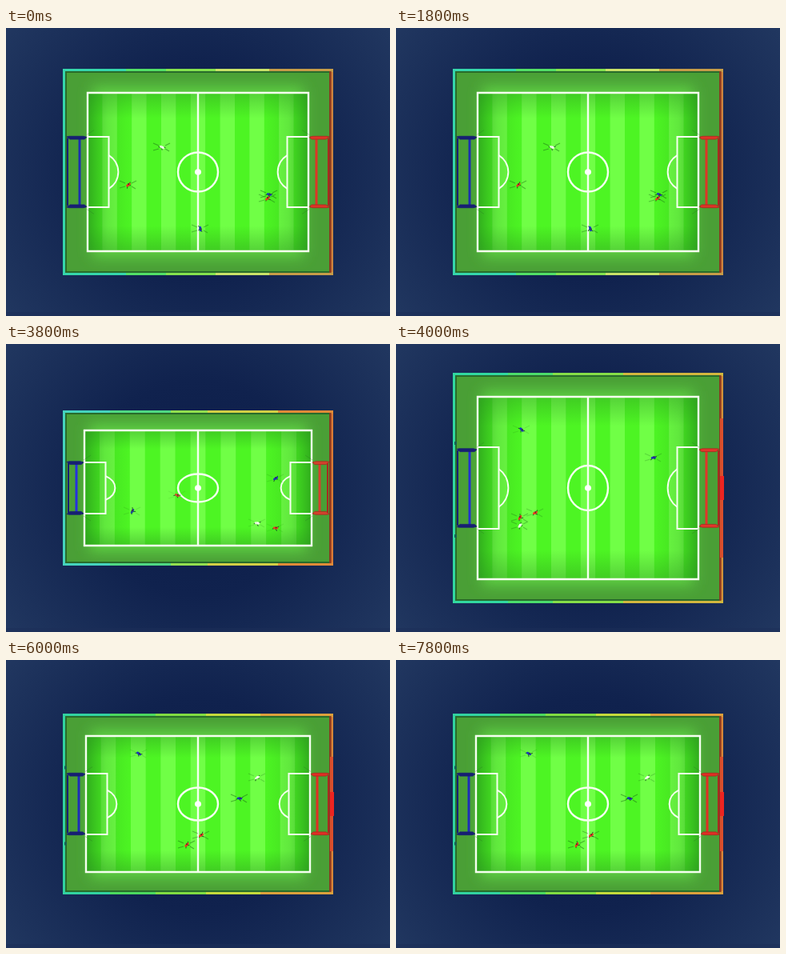
These frames come from a looping animation (480 px wide and 360 px high, 8000 ms). An HTML page:

```html
<!DOCTYPE html>
<html lang="en">
<head>
<meta charset="utf-8">
<title>Pitches</title>
<style>
html, body { margin: 0; width: 100%; height: 100%; overflow: hidden; background: #142651; }
svg { display: block; width: 100vw; height: 100vh; }
</style>
</head>
<body>
<svg id="stage" viewBox="0 0 480 360">
  <defs>
    <radialGradient id="sky" gradientUnits="userSpaceOnUse" cx="240" cy="180" r="300">
      <stop offset="0" stop-color="#0c1d49"/>
      <stop offset=".45" stop-color="#10224e"/>
      <stop offset="1" stop-color="#213760"/>
    </radialGradient>
    <linearGradient id="sides">
      <stop offset="0" stop-color="#1c7a18" stop-opacity=".6"/>
      <stop offset=".09" stop-color="#28981c" stop-opacity=".22"/>
      <stop offset=".2" stop-color="#28981c" stop-opacity="0"/>
      <stop offset=".8" stop-color="#28981c" stop-opacity="0"/>
      <stop offset=".91" stop-color="#28981c" stop-opacity=".22"/>
      <stop offset="1" stop-color="#1c7a18" stop-opacity=".6"/>
    </linearGradient>
    <linearGradient id="ends" x2="0" y2="1">
      <stop offset="0" stop-color="#2a8f20" stop-opacity=".4"/>
      <stop offset=".16" stop-color="#2a8f20" stop-opacity="0"/>
      <stop offset=".84" stop-color="#2a8f20" stop-opacity="0"/>
      <stop offset="1" stop-color="#2a8f20" stop-opacity=".4"/>
    </linearGradient>
    <filter id="soft" x="-20%" y="-20%" width="140%" height="140%"><feGaussianBlur stdDeviation="9"/></filter>
  </defs>
  <rect width="480" height="360" fill="url(#sky)"/>
  <rect y="355" width="480" height="5" fill="#1c2e58" opacity=".5"/>
</svg>
<script>
const NS = 'http://www.w3.org/2000/svg';
const stage = document.getElementById('stage');
const STEP = 200, HOLD = 2000;
const RED = '#f0391f', BLUE = '#1735c4', WHITE = '#e6f7d8';

// h: half height of arena, left/top: pitch corner, box: half height of goal area,
// ry: circle height, goal: half height of goal, bars: post x, rim: [x, colour] bands,
// team: [x, y, colour, turn, shadow strength]
const scenes = [
  { h: 129, left: 102, top: 81, box: 44, ry: 24.5, goal: 42.5, bars: [77, 92], blue: '#1c2fae', red: '#dd3526',
    rim: [[71, '#35d6ab'], [150, '#52df66'], [200, '#84e24e'], [262, '#c9e268'], [329, '#c69c48']], hot: 0,
    team: [[195, 149, WHITE, 30, 1], [153, 196, RED, -45, .9], [329, 208, BLUE, 20, 1],
           [327, 213, RED, -30, .8], [243, 251, BLUE, 80, .8]] },
  { h: 97, left: 98, top: 108, box: 32, ry: 17.5, goal: 31, bars: [78, 88], blue: '#2630e0', red: '#d3432d',
    rim: [[71, '#45d3bd'], [130, '#4fd883'], [206, '#92df4f'], [252, '#d2cf45'], [340, '#e08a38']], hot: 0,
    team: [[158, 209, '#1c4a9c', -50, .3], [214, 189, '#d0532b', 20, .2], [337, 168, BLUE, -35, .3],
           [314, 224, WHITE, 15, .3], [337, 230, RED, 10, .2]] },
  { h: 144, left: 102, top: 66, box: 51, ry: 28, goal: 47, bars: [77, 92], blue: '#2230cf', red: '#e3352a',
    rim: [[71, '#31d8a0'], [140, '#4bdc6c'], [196, '#85de48'], [284, '#d2b73e']], hot: 87,
    team: [[157, 107, BLUE, 50, .3], [322, 142, BLUE, -15, .5], [174, 211, RED, -20, .5],
           [155, 217, RED, -50, .7], [155, 227, WHITE, -55, .7]] },
  { h: 113, left: 100, top: 95, box: 38, ry: 20.5, goal: 36.5, bars: [77, 91], blue: '#1e2cb8', red: '#e02e24',
    rim: [[71, '#31d2a0'], [130, '#4bd85f'], [187, '#80dc42'], [250, '#c4da3c'], [318, '#dba03c']], hot: 59,
    team: [[166, 117, BLUE, 35, .3], [314, 147, WHITE, -35, .5], [292, 173, BLUE, 10, 1],
           [244, 219, RED, -25, .8], [226, 231, RED, -50, 1]] }
];

function add(parent, tag, attrs) {
  const el = document.createElementNS(NS, tag);
  for (const k in attrs) el.setAttribute(k, attrs[k]);
  return parent.appendChild(el);
}
const rect = (p, x, y, width, height, fill, more) => add(p, 'rect', { x, y, width, height, fill, ...more });
const line = (p, d, stroke, w, more) =>
  add(p, 'path', { d, stroke, 'stroke-width': w, fill: 'none', ...more });

function drawRim(g, s) {
  const y = 180 - s.h, last = s.rim[s.rim.length - 1][1];
  s.rim.forEach(([x, colour], i) => {
    const end = s.rim[i + 1] ? s.rim[i + 1][0] : 409;
    rect(g, x, y, end - x, 2 * s.h, colour);
  });
  rect(g, 405, y, 4, 2 * s.h, last);
  rect(g, 405.5, y + 4, 3, 2 * s.h - 8, '#d56b35', { opacity: .65 });
  rect(g, 74, y + 3, 332, 2 * s.h - 6, '#286b2b');
  rect(g, 404, y + 3, 2.5, 2 * s.h - 6, '#883a20');
  rect(g, 76, y + 5, 328, 2 * s.h - 10, '#4a9f36');
  if (s.hot) {
    rect(g, 405, 180 - s.hot, 4, 2 * s.hot, '#d94f2c');
    rect(g, 405, 165, 5, 30, '#ed2421');
    for (const d of [-1, 1]) rect(g, 73, 180 + d * (s.goal + 11), 3, 4, '#176252');
  }
}

function drawPitch(g, s, i) {
  const { left: x, top: y } = s, w = 480 - 2 * x, h = 360 - 2 * y, band = w / 15;
  const clip = add(add(g, 'clipPath', { id: 'grass' + i }), 'rect',
    { x: 76, y: 185 - s.h, width: 328, height: 2 * s.h - 10 });
  const glow = add(g, 'g', { 'clip-path': `url(#${clip.parentNode.id})` });
  rect(glow, x + 6, y - 7, w - 12, h + 14, '#64df46', { filter: 'url(#soft)', opacity: .85 });
  for (let k = 0; k < 15; k++)
    rect(g, x + k * band, y, band + .3, h, k % 2 ? '#70ff46' : '#4df523');
  rect(g, x, y, w, h, 'url(#sides)');
  rect(g, x, y, w, h, 'url(#ends)');
}

function drawLines(g, s) {
  const { left: x, top: y, box, ry } = s, depth = 26.5, rx = 25;
  const reach = ry * .85;
  const ink = (d, w = 2) => line(g, d, '#f6fff0', w);
  ink(`M${x} ${y}H${480 - x}V${360 - y}H${x}ZM240 ${y}V${360 - y}`, 2.4);
  for (const side of [0, 1]) {
    const px = v => side ? 480 - v : v;
    ink(`M${px(x)} ${180 - box}H${px(x + depth)}V${180 + box}H${px(x)}`);
    ink(`M${px(x + depth)} ${180 - reach}A${rx} ${ry} 0 0 ${1 - side} ${px(x + depth)} ${180 + reach}`);
  }
  add(g, 'ellipse', { cx: 240, cy: 180, rx, ry, fill: 'none', stroke: '#f6fff0', 'stroke-width': 2.4 });
  add(g, 'ellipse', { cx: 240, cy: 180, rx: 4, ry: 3.8, fill: '#fff' });
}

function drawGoal(g, s, right) {
  const px = v => right ? 480 - v : v;
  const [a, b] = s.bars, colour = right ? s.red : s.blue, dark = right ? '#a92a20' : '#171f73';
  const top = 180 - s.goal, end = 180 + s.goal, tip = s.left - 1;
  line(g, `M${px(a)} ${top}V${end}`, dark, 2);
  line(g, `M${px(b)} ${top}V${end}`, colour, 3);
  for (const [y, d] of [[top, -1], [end, 1]]) {
    line(g, `M${px(tip)} ${y + d * 4}L${px(tip + 9)} ${y + d * 10}`, '#2c7a24', 1, { opacity: .35 });
    add(g, 'path', {
      d: `M${px(76)} ${y + d * 1.6}L${px(80)} ${y - d * 1.6}H${px(tip - 3)}L${px(tip)} ${y + d}L${px(tip - 4)} ${y + d * 2.2}H${px(79)}Z`,
      fill: right ? colour : dark, stroke: dark, 'stroke-width': .8
    });
  }
}

function drawPlayer(g, [x, y, colour, turn, shade]) {
  const p = add(g, 'g', { transform: `translate(${x} ${y})` });
  line(p, 'M-11-5L-4-2M4 2L9 5M-11 4L-4 2M4-2L10-5', '#1c6d16', 1.3, { opacity: .5 * shade });
  const body = add(p, 'g', {});
  const limbs = line(body, '', '#245a28', 1);
  add(body, 'ellipse', { rx: 3.3, ry: 1.5, fill: colour });
  add(body, 'circle', { cx: .6, cy: -.6, r: 1, fill: colour === WHITE ? '#fff' : '#43352c' });
  return { body, limbs, turn };
}

scenes.forEach((s, i) => {
  const g = s.node = add(stage, 'g', {});
  drawRim(g, s);
  drawPitch(g, s, i);
  drawLines(g, s);
  s.players = s.team.map(t => drawPlayer(g, t));
  drawGoal(g, s, false);
  drawGoal(g, s, true);
});

function render(ms) {
  const t = Math.floor(ms / STEP) * STEP % (HOLD * scenes.length);
  const now = Math.floor(t / HOLD);
  scenes.forEach((s, i) => s.node.setAttribute('display', i === now ? 'inline' : 'none'));
  scenes[now].players.forEach((p, i) => {
    const sway = Math.sin(t / 1000 * Math.PI * 2 + i * 1.7);
    p.body.setAttribute('transform', `rotate(${p.turn + sway * 8})`);
    p.limbs.setAttribute('d', `M-4 ${2 + sway * .7}L-1 0L2 ${3 - sway * .7}M1 0L4 ${-2 + sway * .7}`);
  });
}

const start = performance.now();
function tick() {
  render(performance.now() - start);
  requestAnimationFrame(tick);
}
render(0);
requestAnimationFrame(tick);
</script>
</body>
</html>
```
